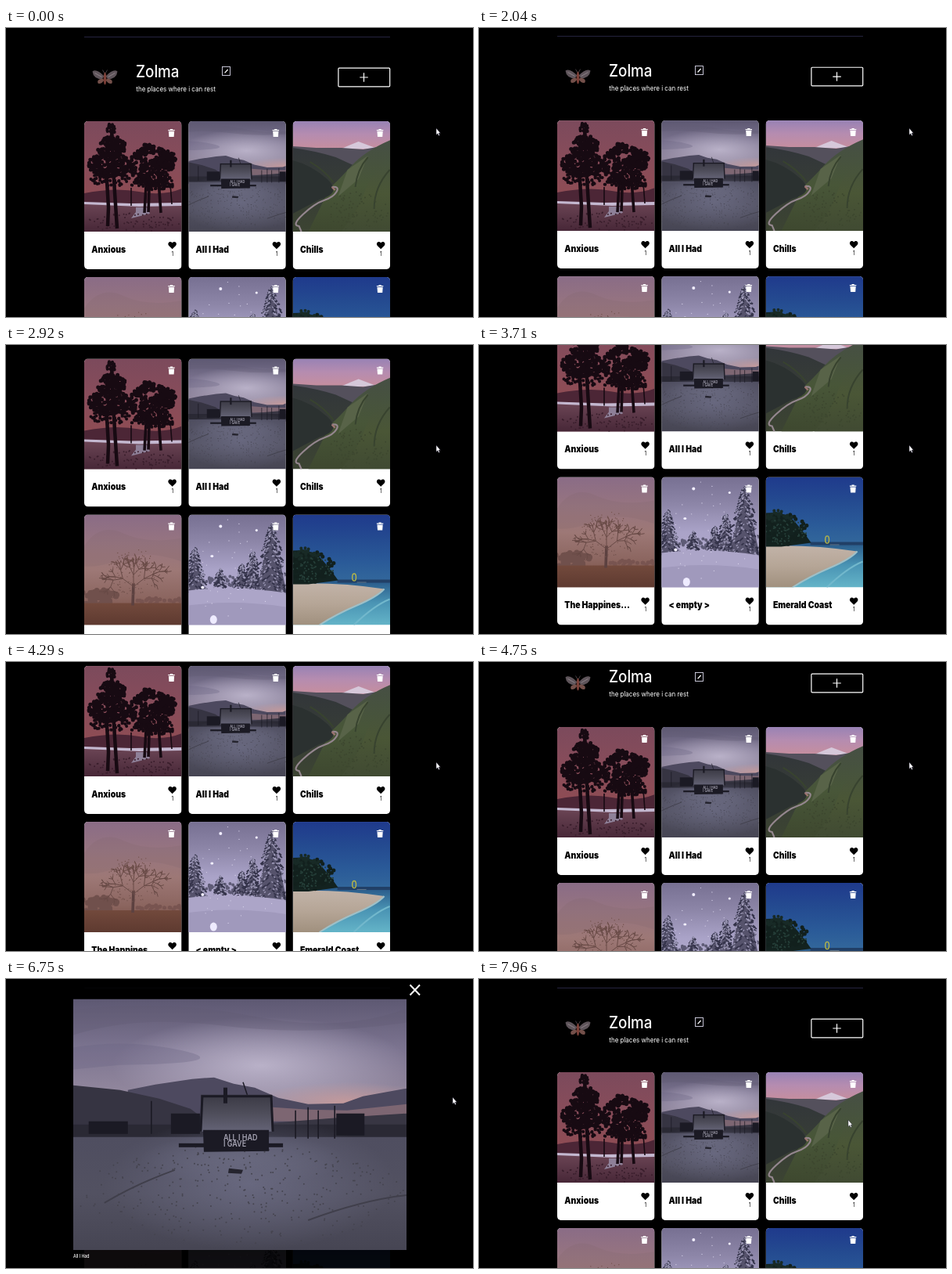
Animation, 597 px wide and 369 px high, one loop 8000 ms. Source, as an HTML page:

```html
<!DOCTYPE html>
<html lang="en">
<head>
<meta charset="utf-8">
<title>Places</title>
<style>
  html, body { margin: 0; width: 100%; height: 100%; overflow: hidden; background: #000; }
  svg { display: block; }
  #stage { width: 597px; height: 369px; font-family: Inter, Roboto, sans-serif; }
</style>
</head>
<body>
<svg id="stage" viewBox="0 0 597 369"></svg>
<script>
const LOOP = 8000;
const stage = document.getElementById('stage');

let seed = 7;
const rnd = () => (seed = (seed * 16807) % 2147483647) / 2147483647;

// ---- drawing helpers ----
let defs = '', gradients = 0;
const stops = colors => colors.map((c, i) =>
  `<stop offset="${i / (colors.length - 1)}" stop-color="${c}"/>`).join('');
const vertical = (...colors) => {
  const id = 'g' + gradients++;
  defs += `<linearGradient id="${id}" x2="0" y2="1">${stops(colors)}</linearGradient>`;
  return `url(#${id})`;
};
const glow = color => {
  const id = 'g' + gradients++;
  defs += `<radialGradient id="${id}"><stop stop-color="${color}"/>` +
    `<stop offset="1" stop-color="${color}" stop-opacity="0"/></radialGradient>`;
  return `url(#${id})`;
};
const rect = (x, y, w, h, fill) => `<rect x="${x}" y="${y}" width="${w}" height="${h}" fill="${fill}"/>`;
const oval = (x, y, rx, ry, fill) => `<ellipse cx="${x}" cy="${y}" rx="${rx}" ry="${ry}" fill="${fill}"/>`;
const fill = (d, color) => `<path d="${d}" fill="${color}"/>`;
const line = (d, color, w = 1) =>
  `<path d="${d}" fill="none" stroke="${color}" stroke-width="${w}"/>`;
const at = (x, y, body) => `<g transform="translate(${x} ${y})">${body}</g>`;
const text = (x, y, size, weight, color, str, more = '') =>
  `<text transform="translate(${x} ${y}) scale(1 1.13)" font-size="${size}" font-weight="${weight}" fill="${color}" ${more}>${str}</text>`;

// n round dots scattered in an ellipse
function dots(n, x, y, rx, ry, size, color) {
  let d = '';
  while (n--) {
    const a = rnd() * 6.283, r = Math.sqrt(rnd());
    d += `M${(x + Math.cos(a) * r * rx).toFixed(1)} ${(y + Math.sin(a) * r * ry).toFixed(1)}h.01`;
  }
  return `<path d="${d}" stroke="${color}" stroke-width="${size}" stroke-linecap="round"/>`;
}

// fir tree: rows of drooping boughs, with snow on top
function fir(x, top, h, w) {
  let dark = '', snow = '';
  for (let i = 0; i < h; i += 2.2) {
    const half = w * (i / h) ** .8 / 2;
    for (let k = 0; k < 7; k++) {
      const bx = (x + (rnd() * 2 - 1) * half).toFixed(1), by = (top + i + rnd() * 3).toFixed(1);
      if (k < 4) dark += `M${bx} ${by}l${bx < x ? -3 : 3} 2.4`;
      else snow += `M${bx} ${by}l${bx < x ? -2 : 2} 1.4`;
    }
  }
  return fill(`M${x} ${top}L${x + w * .4} ${top + h}H${x - w * .4}Z`, '#56536c') +
    line(dark, '#34334a', 1.8) + line(snow, '#9a96b4', 1.4);
}

function branch(x, y, angle, len) {
  if (len < 4) return '';
  const x2 = x + Math.cos(angle) * len, y2 = y + Math.sin(angle) * len;
  let d = `M${x.toFixed(1)} ${y.toFixed(1)}L${x2.toFixed(1)} ${y2.toFixed(1)}`;
  for (const side of [-.7, 0, .7]) d += branch(x2, y2, angle + side + (rnd() - .5), len * (.55 + rnd() * .25));
  return d;
}

// ---- photos ----
const W = 124.5, H = 141;

function pines() {
  const ink = '#170a12';
  return rect(0, 0, W, H, vertical('#7c4a5c', '#874c5a', '#8e4c54', '#78404c')) +
    fill('M0 92Q40 84 70 90T125 86V112H0Z', '#4c2636') +
    rect(0, 106, W, 36, vertical('#6a4454', '#462636')) +
    fill('M0 103L60 105L125 104V108L70 109L0 106Z', '#c4b8d0') +
    fill('M66 110L80 110L84 118L60 124L66 116Z', '#8e8098') +
    dots(90, 62, 129, 62, 12, 2, '#3a1e2c') +
    line('M35 10L37 60L42 137M28 60L31 110L30 134', ink, 4.5) +
    line('M80 65L77 117M84 60L82 116M94 62L98 117', ink, 3.6) +
    line('M60 85V108M110 80L112 106', ink, 1.6) +
    dots(26, 34, 12, 6, 9, 4, ink) + dots(110, 35, 33, 18, 14, 5, ink) +
    dots(200, 32, 56, 27, 16, 5, ink) + dots(70, 34, 74, 26, 9, 4, ink) +
    dots(220, 86, 58, 29, 26, 5, ink) + dots(90, 88, 80, 28, 8, 4, ink) +
    dots(24, 81, 35, 9, 6, 5, ink) + dots(50, 105, 48, 12, 10, 5, ink);
}

// 426 x 320
function hut() {
  const ink = '#1b1a24';
  return rect(0, 0, 426, 190, vertical('#5d5872', '#7c7490', '#958a9f', '#a08490')) +
    oval(240, 85, 190, 62, glow('#b9b1c8')) + oval(350, 132, 120, 26, glow('#c49a9c')) +
    fill('M0 14Q120 0 230 22T426 12V30Q300 48 190 34T0 46Z', '#605a7455') +
    fill('M0 62Q70 50 140 66T60 84L0 90Z', '#6a638055') +
    fill('M70 116L105 109L152 102L180 100L205 108L232 113L262 126L300 134L345 133L370 124L426 114V172H70Z', '#4d495f') +
    fill('M255 138L300 141L350 142L426 134V156H255Z', '#7d6672') +
    fill('M0 110L60 116L110 127L150 140L170 155V182H0Z', '#363442') +
    fill('M255 158L330 152L426 146V182H255Z', '#383643') +
    rect(0, 160, 426, 18, '#2a2934') +
    rect(0, 176, 426, 144, vertical('#4f4e60', '#525161', '#464553')) +
    oval(225, 235, 185, 85, glow('#68687f')) + oval(215, 205, 130, 34, glow('#68687e')) +
    dots(340, 213, 250, 210, 64, 2, '#45444f') +
    line('M40 260Q80 236 130 218M300 282Q370 256 426 250', '#403f4b', 2) +
    rect(125, 146, 37, 26, ink) + rect(336, 146, 36, 28, ink) + rect(20, 156, 50, 16, ink) +
    line('M284 142V178M300 138V178M313 142V178M334 136V178M100 130V172', ink, 1.6) +
    line('M217 106L223 124', ink, 1.5) + rect(135, 184, 133, 5, ink) +
    rect(163, 122, 91, 47, vertical('#3a3944', '#4e4d5a', '#646376')) +
    line('M163 169L165 124H253L255 169', ink, 3) + rect(192, 113, 5, 20, ink) +
    fill('M166 167H250V194L167 195Z', ink) +
    text(192, 180, 9, 600, '#a5a3b2', 'ALL I HAD') + text(192, 188.5, 9, 600, '#a5a3b2', 'I GAVE') +
    fill('M199 216L217 218L215 223L198 222Z', '#25242e');
}

function hills() {
  return rect(0, 0, W, 50, vertical('#9882b4', '#b58cb0', '#c48ea0', '#a8788c')) +
    fill('M60 36L74 30L84 26L92 29L108 35Z', '#d6c8da') +
    fill('M0 32L30 34L62 34L90 36L125 30V80H0Z', '#54505c') +
    fill('M0 34Q30 38 55 46L90 62L60 141H0Z', vertical('#32363a', '#3c4432')) +
    fill('M125 24Q92 38 74 58T48 84L20 141H125Z', vertical('#464f44', '#485638', '#3e482f')) +
    fill('M0 50Q24 56 44 74T34 100L0 118Z', '#2b3130') +
    fill('M125 44Q100 66 92 90T62 141H125Z', vertical('#465240', '#4a5636', '#404a32')) +
    fill('M70 62L96 44L84 74L58 96Z', '#586348') +
    line('M124 62Q104 84 104 112M96 46Q82 62 80 84M22 52Q40 62 52 78', '#38432f', 2) +
    line('M50 84Q60 83 56 90T40 101T13 119T8 134L11 141', '#94868e', 2.2) +
    line('M50 84L54 88', '#9c7470', 2.4) + dots(90, 85, 115, 38, 26, 2, '#3d472f');
}

function oak() {
  return rect(0, 0, W, H, vertical('#8a6c86', '#967480', '#9d7876', '#8c6660', '#70483c')) +
    fill('M0 40Q20 10 50 24T125 30V60Q80 44 50 56T0 66Z', '#7c646c33') +
    dots(60, 18, 106, 26, 10, 7, '#70504c') + dots(30, 96, 110, 30, 5, 5, '#785450') +
    rect(0, 113, W, 28, vertical('#72493c', '#5e3a30')) +
    line('M62 116L63 88', '#5c4140', 3.6) +
    line(branch(63, 94, -1.57, 17) + branch(63, 92, -2.5, 17) + branch(63, 92, -.65, 17), '#684a46', 1) +
    dots(110, 62, 72, 31, 30, 1.4, '#72524c');
}

function snow() {
  return rect(0, 0, W, H, vertical('#777092', '#8d86a8', '#aaa3c8', '#b0a8cc', '#a59dc2')) +
    dots(90, 60, 85, 44, 7, 4, '#5e5b76') +
    fir(40, 68, 24, 16) + fir(68, 62, 30, 20) + fir(82, 46, 48, 24) +
    fir(8, 42, 56, 34) + fir(106, 10, 92, 50) +
    fill('M0 97Q60 90 125 100V141H0Z', '#aca5c8') + fill('M0 116Q60 108 125 118V141H0Z', '#a099bc') +
    dots(40, 62, 70, 62, 68, 1.2, '#d8d3ea') +
    oval(41, 15, 2, 2, '#f1eeff') + oval(87, 20, 1.6, 1.6, '#f1eeff') +
    oval(30, 53, 2, 1.6, '#f1eeff') + oval(18, 93, 2, 2, '#f1eeff') + oval(32, 134, 4.5, 5.5, '#eeebff');
}

function coast() {
  return rect(0, 0, W, 90, vertical('#1f3a8c', '#244a90', '#2a5a98', '#346a9c')) +
    rect(0, 84, W, 57, vertical('#285888', '#4a94b4', '#64b4c8')) +
    rect(57, 83, 68, 4, '#213f66') +
    fill('M0 88Q60 86 117 95Q108 105 82 116T34 141H0Z', vertical('#c2b3a8', '#b5a596', '#a0907e')) +
    line('M117 95Q108 105 82 116T34 141', '#9ec0c8', 2) +
    line('M124 108Q104 116 78 141', '#72b8cc', 2) +
    fill('M0 46Q24 44 34 54T58 84L20 89H0Z', '#13221f') +
    dots(70, 22, 67, 32, 20, 5, '#12201d') + dots(40, 18, 50, 18, 8, 4, '#182a26') +
    dots(70, 24, 70, 28, 16, 2, '#26403a') +
    '<ellipse cx="78.5" cy="80" rx="2.4" ry="4.6" fill="none" stroke="#b5b548" stroke-width="1.4"/>' +
    line('M82 86.5H94', '#7c8c94', .7);
}

// ---- page ----
const hutPhoto = hut();
const photo = (x, y, w, h, vw, vh, body) =>
  `<svg x="${x}" y="${y}" width="${w}" height="${h}" viewBox="0 0 ${vw} ${vh}" preserveAspectRatio="xMidYMid slice">${body}</svg>`;

const trash = fill('M-4.2-4H-1.6V-5H1.6V-4H4.2V-2.7H-4.2ZM-3.6-2H3.6L3.1 5H-3.1Z', '#fff');
const heart = fill('M0 5L-4.4 .6C-7-2.4-3.2-6.4 0-3C3.2-6.4 7-2.4 4.4 .6Z', '#000');

function card(i, title, body, vw = W, vh = H) {
  return at(100 + i % 3 * 133.3, 119 + (i > 2 ? 199 : 0),
    `<g clip-path="url(#card)">${rect(0, 0, W, 189, '#fff')}${photo(0, 0, W, H, vw, vh, body)}</g>` +
    at(111.5, 15, trash) + at(112.6, 158.3, heart) +
    text(9.3, 167.8, 10.4, 900, '#000', title) +
    text(112.8, 171.7, 6.4, 400, '#000', '1', 'text-anchor="middle"'));
}

const moth =
  fill('M15 9Q5-1 0 3Q1 12 12 13ZM17 9Q27-1 32 3Q31 12 20 13Z', '#5e545a') +
  fill('M13 12Q5 13 7 18Q11 20 15 14ZM19 12Q27 13 25 18Q21 20 17 14Z', '#74504a') +
  line('M3 5L12 10M29 5L20 10', '#8d8288') + oval(16, 12, 1.8, 8, '#7c4038') +
  line('M15 5L13 1M17 5L19 1', '#60555c', .7);

const header =
  rect(100, 11, 391, 1, '#26243f') + at(110.5, 52.5, moth) +
  text(166, 62.5, 18.8, 500, '#fff', 'Zolma') +
  text(166.3, 80.5, 8, 400, '#fff', 'the places where i can rest') +
  `<rect x="276.5" y="49.5" width="10" height="11" fill="none" stroke="#d8d6e8" stroke-width=".9"/>` +
  line('M279.6 57.4L283.6 53', '#fff', 1.3) +
  `<rect x="424.9" y="51.2" width="65.8" height="23.6" rx="1" fill="none" stroke="#fff" stroke-width="1.2"/>` +
  line('M452.3 63H462.8M457.5 57.3V68.7', '#fff', 1.2);

const popup = rect(0, 0, 597, 369, 'rgba(0,0,0,.9)') +
  photo(86, 25.5, 426, 320.5, 426, 320, hutPhoto) +
  text(86, 356.2, 5.2, 500, '#fff', 'All I Had') +
  line('M516.5 7.5L529 20.5M529 7.5L516.5 20.5', '#fff', 2);

const page = header +
  card(0, 'Anxious', pines()) + card(1, 'All I Had', hutPhoto, 426, 320) + card(2, 'Chills', hills()) +
  card(3, 'The Happines…', oak()) + card(4, '&lt; empty &gt;', snow()) + card(5, 'Emerald Coast', coast());

stage.innerHTML =
  `<defs>${defs}<clipPath id="card"><rect width="${W}" height="189" rx="4.5" ry="5"/></clipPath></defs>` +
  `<g id="page">${page}</g><g id="popup">${popup}</g>` +
  `<path id="cursor" d="M0 0V8.4L1.8 6.7L3.1 9.6L4.4 9L3.2 6.2H5.4Z" fill="#fff" stroke="#15122a" stroke-width=".4"/>`;

// ---- motion ----
const [pageEl, popupEl, cursorEl] = ['page', 'popup', 'cursor'].map(id => document.getElementById(id));

const ease = (t, from, to) => {
  const x = Math.min(1, Math.max(0, (t - from) / (to - from)));
  return x * x * (3 - 2 * x);
};

// start, end, x, y of each cursor move
const moves = [[5160, 5460, 318, 190], [6460, 6720, 571, 151], [7330, 7500, 522, 13], [7640, 7940, 472, 180]];

function draw(t) {
  const scroll = 149.5 * (ease(t, 1970, 3500) - ease(t, 3890, 5155));
  pageEl.setAttribute('transform', `translate(0 ${-scroll.toFixed(2)})`);

  const shown = ease(t, 5670, 6070) - ease(t, 7520, 7900);
  popupEl.setAttribute('opacity', shown);
  popupEl.setAttribute('visibility', shown > 0 ? 'visible' : 'hidden');

  let x = 550, y = 128;
  for (const [from, to, nx, ny] of moves) {
    const k = ease(t, from, to);
    x += (nx - x) * k;
    y += (ny - y) * k;
  }
  cursorEl.setAttribute('transform', `translate(${x} ${y})`);
}

function tick() {
  draw(performance.now() % LOOP);
  requestAnimationFrame(tick);
}
tick();
</script>
</body>
</html>
```
